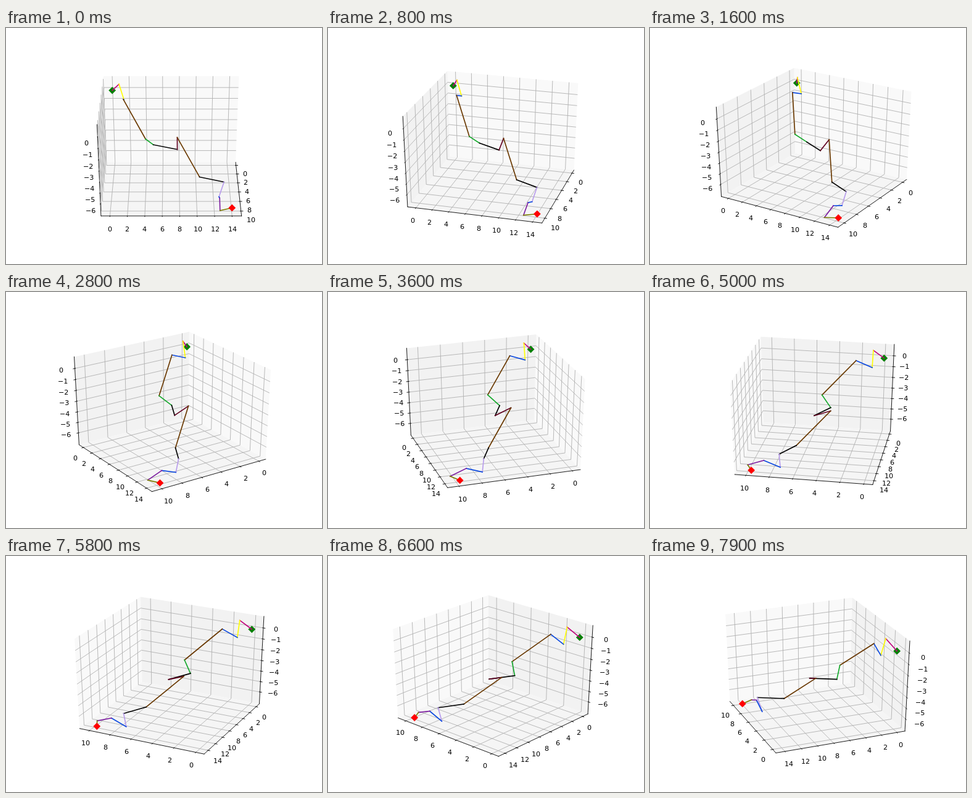
An HTML page with a canvas that plays this animation: 512x384 px, repeating every 8 s.

```html
<!DOCTYPE html>
<html>
<head>
<meta charset="utf-8">
<style>
html, body { margin: 0; width: 512px; height: 384px; overflow: hidden; background: #fff; }
canvas { display: block; }
</style>
</head>
<body>
<canvas id="stage" width="512" height="384"></canvas>
<script>
const ctx = document.getElementById('stage').getContext('2d');
const PT = 80 / 72;
const EDGE = 0.5 + 1 / 48;
const LABEL_GAP = 11.5 * 48 / (0.9 * 692.48) / 12;
const STEP_MS = 100, STEPS = 80;
const ELEV = Math.PI / 6, SE = Math.sin(ELEV), CE = Math.cos(ELEV);

// Walk along vertex directions of a dodecahedron.
const PHI = (1 + Math.sqrt(5)) / 2, INV = 1 / PHI, UNIT = Math.SQRT2 / PHI;
const BROWN = '#693800', BLUE = '#0a48e0';
const MOVES = [
  [1, 1, 1, 1, '#c0007c'],
  [0, INV, -PHI, 1, '#ffff00'],
  [PHI, 0, INV, 1, BLUE],
  [1, 1, -1, 3, BROWN],
  [-1, 1, -1, 1, '#12a82a'],
  [INV, PHI, 0, 2, '#000'],
  [-PHI, 0, INV, 1, '#600020'],
  [1, 1, -1, 3, BROWN],
  [INV, PHI, 0, 2, '#000'],
  [0, -INV, -PHI, 1, '#b89cec'],
  [PHI, 0, INV, 1, BLUE],
  [PHI, 0, -INV, 1, '#7c1ca0'],
  [-INV, PHI, 0, 1, '#7c7c00']
];
const path = [[0, 0, 0]];
for (const [x, y, z, n] of MOVES) {
  const last = path[path.length - 1];
  path.push([x, y, z].map((d, i) => last[i] + d * n * UNIT));
}

// Axis limits: 5% margin on the two horizontal axes, none on z.
const scales = [0, 1, 2].map(i => {
  const vals = path.map(p => p[i]);
  const lo = Math.min(...vals), hi = Math.max(...vals);
  return { mid: (lo + hi) / 2, span: (hi - lo) * (i < 2 ? 1.1 : 1) };
});
const norm = (v, i) => (v - scales[i].mid) / scales[i].span;
const points = path.map(p => p.map(norm));

const range = (from, to, by) => {
  const out = [];
  for (let v = from; v <= to; v += by) out.push(v);
  return out;
};
const AXES = [
  { ticks: range(0, 10, 2), pane: '#f9f9f9', side: 1 },
  { ticks: range(0, 14, 2), pane: '#f2f2f2', side: 0 },
  { ticks: range(-6, 0, 1), pane: '#f5f5f5', side: 0 }
];

let ca = 1, sa = 0;
function project([x, y, z]) {
  const right = y * ca - x * sa;
  const near = x * ca + y * sa;
  const up = z * CE - near * SE;
  const depth = 10 - near * CE - z * SE;
  return [
    64 + (right / depth + 0.095) / 0.185 * 396.8,
    341.76 - (up / depth + 0.095) / 0.185 * 295.68
  ];
}

function trace(pts) {
  ctx.beginPath();
  for (const p of pts) ctx.lineTo(...project(p));
}

function line(pts, color, width, cap) {
  trace(pts);
  ctx.strokeStyle = color;
  ctx.lineWidth = width * PT;
  ctx.lineCap = cap || 'butt';
  ctx.stroke();
}

function put(p, i, v) {
  const q = p.slice();
  q[i] = v;
  return q;
}
const flip = (p, i) => put(p, i, -p[i]);

function drawPane(i, back) {
  const a = (i + 1) % 3, b = (i + 2) % 3;
  trace([back, flip(back, a), flip(flip(back, a), b), flip(back, b)]);
  ctx.fillStyle = AXES[i].pane;
  ctx.fill();
}

// Glyphs sit on whole pixels, nudged by their left bearing.
function drawLabel(value, p) {
  const [x, y] = project(p);
  const text = String(value).replace('-', '\u2212');
  const m = ctx.measureText(text);
  const left = x - m.width / 2 - m.actualBoundingBoxLeft;
  ctx.fillStyle = '#000';
  ctx.fillText(text, Math.round(left), Math.round(y + 8));
}

function drawAxis(i, back) {
  const { ticks, side } = AXES[i];
  const edge = flip(back, side);
  line([edge, flip(edge, i)], '#000', 0.8, 'square');

  for (const t of ticks) {
    const base = put(back, i, norm(t, i));
    line([flip(base, (i + 1) % 3), base, flip(base, (i + 2) % 3)], '#b0b0b0', 0.8);
  }

  const out = Math.sign(edge[side]) / 12;
  for (const t of ticks) {
    const base = put(edge, i, norm(t, i));
    line([
      put(base, side, base[side] - 0.1 * out),
      put(base, side, base[side] + 0.2 * out)
    ], '#000', 0.8);
    drawLabel(t, base.map((v, k) => k === i ? v : v + Math.sign(v) * LABEL_GAP));
  }
}

function diamond(p, color) {
  const [x, y] = project(p), r = 5.9;
  ctx.beginPath();
  ctx.moveTo(x, y - r);
  ctx.lineTo(x + r, y);
  ctx.lineTo(x, y + r);
  ctx.lineTo(x - r, y);
  ctx.closePath();
  ctx.fillStyle = color;
  ctx.fill();
}

function draw(step) {
  const azim = step * 2 * Math.PI / 180;
  ca = Math.cos(azim);
  sa = Math.sin(azim);
  ctx.fillStyle = '#fff';
  ctx.fillRect(0, 0, 512, 384);
  ctx.font = 10 * PT + 'px "DejaVu Sans", sans-serif';

  const back = [ca < 0 ? EDGE : -EDGE, sa < 0 ? EDGE : -EDGE, -EDGE];
  for (let i = 0; i < 3; i++) drawPane(i, back);
  for (let i = 0; i < 3; i++) drawAxis(i, back);

  diamond(points[0], '#008000');
  MOVES.forEach((m, k) => line([points[k], points[k + 1]], m[4], 1.5, 'square'));
  diamond(points[points.length - 1], '#ff0000');
}

function tick() {
  draw(Math.floor(performance.now() / STEP_MS) % STEPS);
  requestAnimationFrame(tick);
}
tick();
</script>
</body>
</html>
```
